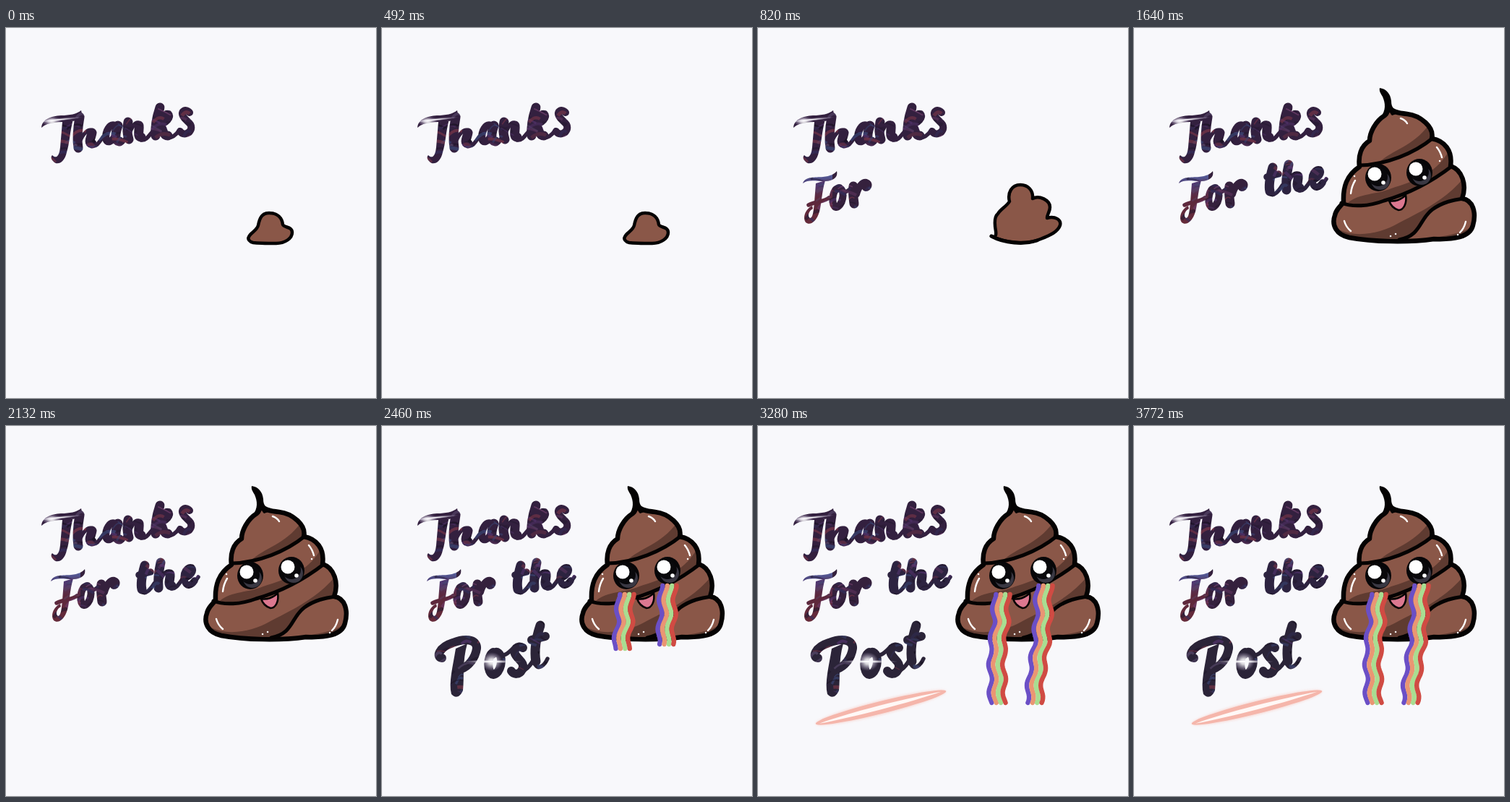
Recreate the animation shown at these times as an HTML page. Size 512x512 px, loop 4100 ms.

```html
<!DOCTYPE html>
<html lang="en">
<head>
<meta charset="utf-8">
<title>Thanks For the Post</title>
<style>
html, body { margin: 0; width: 100%; height: 100%; overflow: hidden; background: #f8f8fb; }
svg { display: block; width: 100vw; height: 100vh; }
.ink { fill: none; stroke: #fff; stroke-linecap: round; stroke-linejoin: round; }
.line { fill: none; stroke: #050303; stroke-width: 5; stroke-linecap: round; stroke-linejoin: round; }
.skin { fill: #8a5748; stroke: #050303; stroke-width: 4.5; stroke-linejoin: round; }
.dark { fill: #5f3b31; }
.shine { fill: none; stroke: #fff; stroke-width: 2.4; stroke-linecap: round; }
</style>
</head>
<body>
<svg id="stage" viewBox="0 0 512 512" role="img" aria-label="Thanks For the Post">
  <defs>
    <radialGradient id="glow">
      <stop offset="0" stop-color="#fff"/>
      <stop offset=".3" stop-color="#fff" stop-opacity=".8"/>
      <stop offset="1" stop-color="#b9a9d0" stop-opacity="0"/>
    </radialGradient>
    <linearGradient id="tint" x2="0" y2="1">
      <stop offset="0" stop-color="#5f78b4"/>
      <stop offset=".25" stop-color="#4c3f78"/>
      <stop offset=".5" stop-color="#6d2a3c" stop-opacity=".7"/>
      <stop offset="1" stop-color="#7d3038" stop-opacity=".7"/>
    </linearGradient>
    <clipPath id="body"><path id="bodyClip"/></clipPath>
    <filter id="soft" x="-20%" y="-60%" width="140%" height="220%"><feGaussianBlur stdDeviation="1.4"/></filter>
  </defs>

  <g id="words"></g>

  <g data-from="0" data-to="0">
    <path class="skin" d="M336 289C338 283 347 281 349 273C351 263 354 256 364 256C376 256 382 263 383 272C385 277 396 274 396 283C396 291 386 298 374 298C360 298 350 298 342 297C337 296 334 292 336 289Z"/>
  </g>

  <g data-from="1" data-to="1">
    <path class="skin" d="M323 288C328 291 330 288 329 281C327 270 327 261 332 257C336 250 344 247 348 240C345 228 351 217 363 217C374 217 381 225 380 236C389 231 404 238 404 248C404 254 400 258 400 263C411 260 420 265 418 273C415 282 404 287 391 292C373 300 343 298 323 288Z"/>
    <path class="line" d="M323 288C341 298 368 300 386 294"/>
  </g>

  <g data-from="2" data-to="4">
    <path id="bodyFill" fill="#8a5748"/>
    <g clip-path="url(#body)">
      <path class="dark" d="M338 187C358 168 386 164 408 134L416 153C394 172 366 184 338 187Z"/>
      <path class="dark" d="M296 242C312 228 336 231 356 222C388 212 416 202 434 173L442 190C413 212 381 229 346 239C328 246 310 247 296 242Z"/>
      <path class="dark" d="M284 279C308 291 342 284 366 270C392 256 428 241 456 208V236C441 238 427 241 413 251C398 264 396 284 374 293C340 299 304 297 284 279Z"/>
      <path class="dark" d="M376 293C400 290 440 291 466 276V296H376Z"/>
    </g>
    <path id="bodyLine" class="line" style="stroke-width:6.5"/>
    <path class="line" d="M313 190C349 189 387 174 414 152M287 242C302 248 325 247 346 239C381 229 413 212 440 191M367 293C398 287 394 265 413 251C427 241 441 238 456 236"/>
    <path fill="#050303" d="M340 83C349 84 355 91 356 101C356 110 360 114 369 117L357 121C353 117 353 113 352 111C352 117 348 122 341 124C349 114 348 104 344 95C341 90 339 87 340 83Z"/>
    <path class="shine" d="M369 125Q375 127 378 132M419 165Q424 171 426 179M306 211Q301 219 300 229M291 267Q293 275 300 281M459 268Q457 277 451 283"/>
    <path class="shine" d="M305 205h.1M423 184h.1M355 288h.1M362 285h.1M448 286h.1"/>
    <g id="eyes"></g>
    <path d="M353 239C361 241 371 237 376 231C378 243 373 252 366 252C359 250 355 245 353 239Z" fill="#dc7890" stroke="#050303" stroke-width="2.6" stroke-linejoin="round"/>
  </g>

  <g id="tears" data-from="3" data-to="4" fill="none" stroke-width="6.4" stroke-linecap="round"></g>

  <g data-from="4" data-to="4" transform="translate(170 389.5) rotate(-14)">
    <ellipse rx="93" ry="10" fill="#f8cfc8" opacity=".7" filter="url(#soft)"/>
    <ellipse rx="93" ry="8.5" fill="#f5b6ab"/>
    <path d="M-88 1C-45 -4 43 -4 86 -1C44 3 -44 4 -88 1Z" fill="#fff8f6"/>
  </g>
</svg>
<script>
const NS = 'http://www.w3.org/2000/svg';
const byId = id => document.getElementById(id);
const STEP = 820, COUNT = 5;

function add(parent, tag, attrs) {
  const el = document.createElementNS(NS, tag);
  for (const k in attrs) el.setAttribute(k, attrs[k]);
  return parent.appendChild(el);
}

let seed = 11;
function rand() {
  seed = (seed * 16807) % 2147483647;
  return seed / 2147483647;
}

// Brush lettering: heavy stems, medium curves, hairline joins, filled swashes
const WORDS = [
  { text: 'Thanks', from: 0, box: [44, 98, 222, 94], base: '#33203f', mid: 10,
    fill: 'M49 138C50 126 62 122 76 121C88 121 98 119 104 114C107 123 101 129 89 129C74 131 59 129 49 138ZM78 130L93 126C88 145 88 160 84 172C81 187 70 191 65 184C62 181 62 178 64 176C70 182 74 176 75 165Z',
    heavy: 'M102 123C99 140 98 154 100 166M119 145C118 151 113 159 119 160M155 135C151 146 150 156 157 157M169 130C167 140 168 148 170 154M184 135C185 142 181 150 187 151M213 110C208 125 206 138 207 149M215 138C218 142 217 149 224 149',
    curve: 'M151 135C143 132 138 143 138 152C139 161 147 158 152 147M210 134C222 132 229 123 225 119C220 117 213 126 211 134M254 117C249 111 241 115 245 122C249 130 258 131 256 140C253 148 244 148 241 143',
    hair: 'M101 160C106 146 114 139 119 142M119 163C125 165 129 158 134 151M157 160C162 160 164 155 167 149M170 149C174 135 180 129 184 132M187 155C194 156 197 150 203 143M224 152C231 152 236 147 240 141' },
  { text: 'For', from: 1, box: [58, 194, 104, 82], base: '#35213d', mid: 10, tint: true,
    fill: 'M62 215C65 205 79 207 90 206C100 205 106 202 109 198C111 207 104 211 94 212C80 212 69 209 62 215ZM80 215L93 211C88 228 88 243 85 254C81 268 72 274 66 269C61 262 66 250 75 246L76 250C70 253 68 261 72 263C76 263 77 252 78 241Z',
    heavy: 'M132 219C131 227 132 236 133 243',
    curve: 'M110 222C102 225 101 247 108 248C117 247 121 226 114 222Q112 220 108 224M136 230C139 219 145 213 150 214C154 215 153 221 149 221',
    hair: 'M70 245C82 239 91 241 98 235M117 224C121 229 126 225 130 220' },
  { text: 'the', from: 2, box: [176, 178, 96, 62], base: '#2d2340', mid: 9.5,
    heavy: 'M192 193C188 207 186 218 188 226M214 189C211 203 210 214 211 224M227 205C228 211 223 220 229 221',
    curve: 'M184 206L200 202M246 211C256 208 261 200 257 196C251 194 244 203 247 214C250 224 257 220 261 214',
    hair: 'M188 229C193 234 200 226 205 218M212 217C217 204 223 199 227 202M229 225C235 226 239 219 244 212M261 216L266 209' },
  { text: 'Post', from: 3, box: [68, 264, 168, 116], base: '#2b2438', mid: 12,
    fill: 'M102 308L118 301C111 325 114 348 112 366C108 376 101 377 96 371C92 355 98 333 102 308Z',
    heavy: 'M219 276C214 291 210 309 213 326',
    curve: 'M83 321C74 320 79 306 98 300C119 292 132 297 131 308C129 322 119 333 110 336M154 313C145 318 145 342 154 344C164 343 169 321 161 314Q157 311 153 316M195 307C188 302 180 310 185 317C190 325 198 327 194 337C190 345 182 344 179 339M207 296L226 291',
    hair: 'M162 315C168 320 174 315 181 308M197 338C204 334 207 328 211 321M212 330C217 338 225 331 229 322' }
];
const HUES = ['#553570', '#6d3d6a', '#33305e', '#7a3648', '#17101f', '#3c4878', '#23182e', '#5a4a6e'];

WORDS.forEach((w, i) => {
  const [x, y, wd, ht] = w.box;
  const mask = add(byId('stage').querySelector('defs'), 'mask',
    { id: 'word' + i, maskUnits: 'userSpaceOnUse', x, y, width: wd, height: ht });
  if (w.fill) add(mask, 'path', { d: w.fill, fill: '#fff' });
  [['heavy', 13], ['curve', w.mid], ['hair', 5.5]].forEach(([k, width]) =>
    add(mask, 'path', { d: w[k], class: 'ink', 'stroke-width': width }));
  const g = add(byId('words'), 'g',
    { mask: `url(#word${i})`, 'data-from': w.from, 'data-to': 4, 'aria-label': w.text });
  add(g, 'rect', { x, y, width: wd, height: ht, fill: w.base });
  if (w.tint) add(g, 'rect', { x, y, width: 45, height: ht, fill: 'url(#tint)' });
  for (let n = 0; n < wd / 2; n++) {
    const px = x + rand() * wd, py = y + rand() * ht, dx = 8 + rand() * 16, dy = rand() * 22 - 11;
    add(g, 'path', {
      d: `M${px} ${py}q${dx / 2} ${dy - 5} ${dx} ${dy}`, fill: 'none',
      stroke: HUES[Math.floor(rand() * HUES.length)],
      'stroke-width': 1 + rand() * 4, opacity: .35 + rand() * .4
    });
  }
  const flare = (cx, cy, rx, ry, turn = 0) => add(g, 'ellipse',
    { cx, cy, rx, ry, fill: 'url(#glow)', transform: `rotate(${turn} ${cx} ${cy})` });
  if (w.text === 'Thanks') { flare(63, 129, 14, 7); flare(72, 127, 34, 2, -6); }
  if (w.text === 'Post') { flare(152, 326, 15, 13); flare(152, 326, 42, 2.5); }
});

const BODY = 'M352 108C355 116 367 118 378 119C396 121 416 137 412 153C430 156 441 170 438 191C454 196 461 217 454 236C469 238 474 255 469 273C465 290 442 293 415 292C380 297 330 296 298 290C280 286 273 273 278 259C280 250 286 247 290 241C289 220 294 204 312 192C310 177 314 163 326 156C326 145 334 129 347 121C352 117 352 112 352 108Z';
['bodyClip', 'bodyFill', 'bodyLine'].forEach(id => byId(id).setAttribute('d', BODY));

function eye(cx, cy) {
  const g = add(byId('eyes'), 'g', { transform: `translate(${cx} ${cy})` });
  const dot = (x, y, rx, ry, fill) => add(g, 'ellipse', { cx: x, cy: y, rx, ry, fill });
  dot(0, 0, 18, 19, '#070608');
  dot(3, 4, 13, 13, '#3a3843');
  dot(0, -1, 13, 13, '#09080b');
  dot(-5, -5, 9.5, 9.5, '#fff');
  dot(7, 7, 2.8, 2.8, '#fff');
}
eye(338, 207);
eye(395, 200);

// Each stream follows a few guide points, with a ripple on top
const STREAMS = [
  { guide: [[233, 327], [270, 326], [312, 321], [384, 322]], gap: 6.4, cut: 310, end: 384 },
  { guide: [[221, 386], [268, 385], [302, 382], [340, 376], [384, 372]], gap: 6.4, cut: 303, end: 383 }
];
const COLORS = ['#6b4fc6', '#ea9673', '#a9dd91', '#d04b43'];

function guideX(points, y) {
  let k = 1;
  while (k < points.length - 1 && y > points[k][0]) k++;
  const [y0, x0] = points[k - 1], [y1, x1] = points[k];
  return x0 + (x1 - x0) * (y - y0) / (y1 - y0);
}

function streamPath(s, n, bottom) {
  const top = s.guide[0][0], pts = [];
  for (let y = top; y <= bottom; y += 3) {
    const wave = 2.4 * Math.cos((y - top) / 6.2);
    pts.push((guideX(s.guide, y) + n * s.gap + wave).toFixed(1) + ' ' + y);
  }
  return 'M' + pts.join('L');
}

const strands = STREAMS.flatMap(s => COLORS.map((stroke, n) =>
  ({ s, n, el: add(byId('tears'), 'path', { stroke }) })));

const layers = [...document.querySelectorAll('[data-from]')];
let shown = -1;

function draw(ms) {
  const step = Math.floor(ms / STEP) % COUNT;
  if (step === shown) return;
  shown = step;
  layers.forEach(el => {
    const on = step >= +el.dataset.from && step <= +el.dataset.to;
    el.style.display = on ? '' : 'none';
  });
  strands.forEach(({ s, n, el }) => el.setAttribute('d', streamPath(s, n, step < 4 ? s.cut : s.end)));
}

const start = performance.now();
function tick() {
  draw(performance.now() - start);
  requestAnimationFrame(tick);
}
tick();
</script>
</body>
</html>
```
